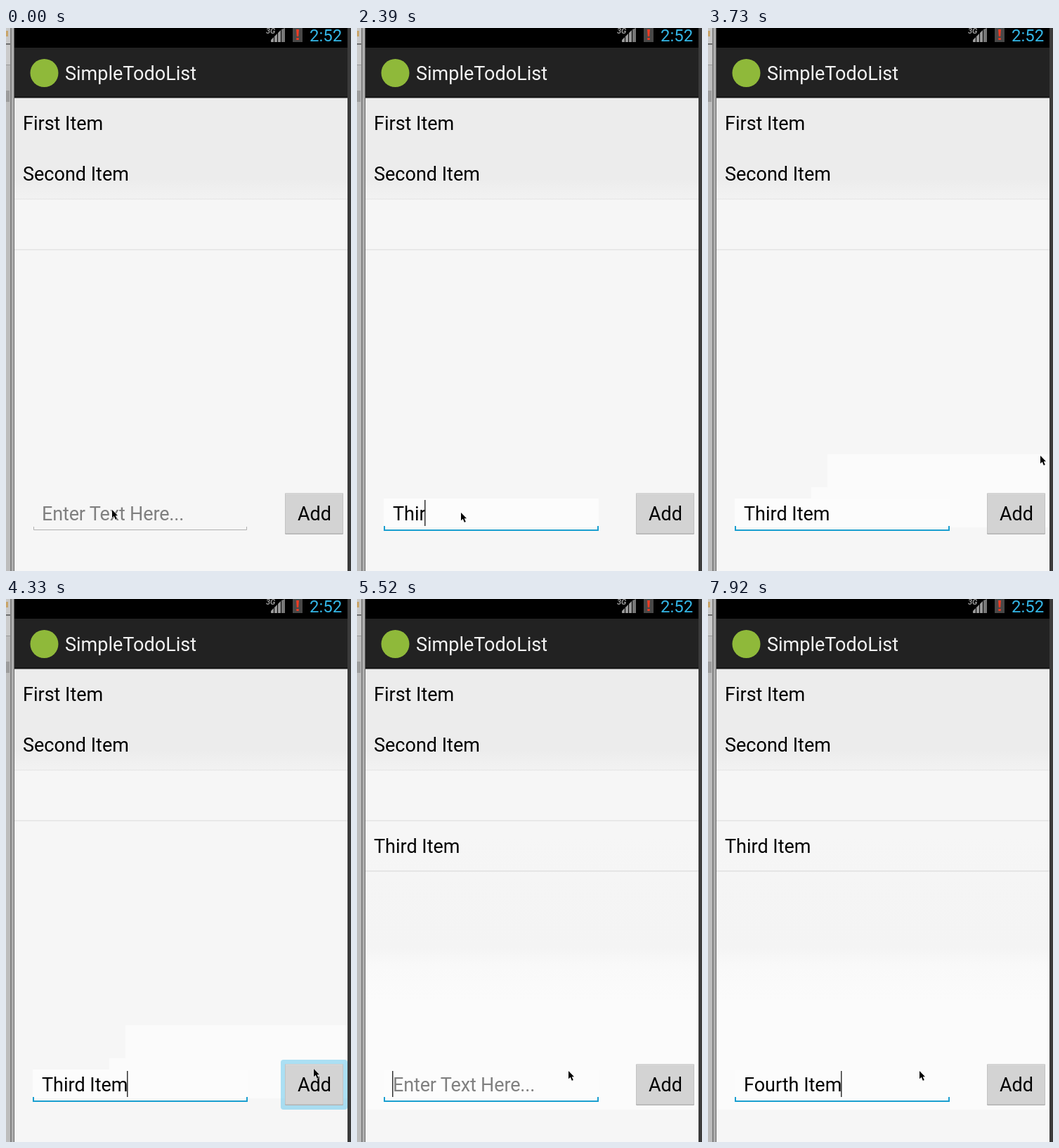
Recreate the animation shown at these times as an HTML page. Size 491 px wide and 772 px high, loop 8 s.

```html
<!DOCTYPE html>
<html lang="en">
<head>
<meta charset="utf-8">
<title>Todo list</title>
<style>
html, body { margin: 0; width: 100%; height: 100%; overflow: hidden; background: #f6f6f6; }
svg { display: block; width: 100%; height: 100%; }
text { font-family: Roboto, sans-serif; font-size: 27px; white-space: pre; }
</style>
</head>
<body>
<svg viewBox="0 0 491 772" xmlns="http://www.w3.org/2000/svg">
  <defs>
    <linearGradient id="rows" x1="0" y1="0" x2="0" y2="1">
      <stop offset="0" stop-color="#ececec"/>
      <stop offset=".8" stop-color="#ececec"/>
      <stop offset="1" stop-color="#f2f2f2"/>
    </linearGradient>
    <linearGradient id="lower" x1="0" y1="0" x2="0" y2="1">
      <stop offset="0" stop-color="#f6f6f6"/>
      <stop offset=".14" stop-color="#f5f5f5"/>
      <stop offset=".4" stop-color="#f4f4f4"/>
      <stop offset=".47" stop-color="#f9f9f9"/>
      <stop offset=".6" stop-color="#fbfbfb"/>
      <stop offset="1" stop-color="#fbfbfb"/>
    </linearGradient>
  </defs>

  <!-- window edges -->
  <rect width="12" height="772" fill="#bdbdbd"/>
  <rect width="6" height="22" fill="#c9c9c9"/>
  <rect y="4" width="3" height="8" fill="#c9a56a"/>
  <rect y="22" width="7" height="1.5" fill="#555"/>
  <rect y="24" width="6" height="28" fill="#cbcbcb"/>
  <rect y="52" width="6" height="1" fill="#999"/>
  <rect y="89" width="5" height="16" fill="#9c9c9c"/>
  <rect x="6" width="2" height="772" fill="#838383"/>
  <rect x="8" width="3" height="772" fill="#b0b0b0"/>
  <rect x="11" width="1" height="772" fill="#666"/>
  <rect x="486" width="5" height="772" fill="#3b3b3b"/>

  <!-- page -->
  <rect x="12" width="474" height="772" fill="#f6f6f6"/>
  <rect x="12" y="99" width="474" height="144" fill="url(#rows)"/>
  <rect x="12" y="242.5" width="474" height="1.5" fill="#e9e9e9"/>
  <rect x="12" y="314.5" width="474" height="1.5" fill="#e4e4e4"/>

  <!-- status and title bars -->
  <rect x="12" width="474" height="28" fill="#000"/>
  <text x="370" y="7.5" fill="#999" style="font-size:11px;font-weight:700;font-style:italic">3G</text>
  <path d="M377 20V17L381 13V20ZM382 20V12L386 8V20ZM387 20V7L391 3V20Z" fill="#999"/>
  <path d="M392 20V2L397 0V20Z" fill="#777"/>
  <rect x="408" y="0" width="14" height="20" fill="#484848"/>
  <path d="M413.2 2H416.8L416.2 12H413.8ZM413.4 14H416.6V17H413.4Z" fill="#ff3b22"/>
  <text x="432" y="19" fill="#33b5e5" style="font-size:24px">2:52</text>
  <rect x="12" y="28" width="474" height="70" fill="#222"/>
  <rect x="12" y="97" width="474" height="2.5" fill="#161616"/>
  <circle cx="54.5" cy="64" r="20" fill="#8fb93a"/>
  <text x="84" y="74" fill="#f3f3f3">SimpleTodoList</text>

  <text x="24" y="145">First Item</text>
  <text x="24" y="217">Second Item</text>

  <g id="added">
    <rect x="12" y="340" width="474" height="386" fill="url(#lower)"/>
    <rect x="12" y="386" width="474" height="1.5" fill="#e0e0e0"/>
    <text x="24" y="361">Third Item</text>
  </g>
  <path id="trailA" d="M147 653H182V710H147Z" fill="#fbfbfb"/>
  <path id="trailB" d="M170 606H486V710H170Z" fill="#fbfbfb"/>

  <!-- input -->
  <path id="idle" d="M39.5 709V713.5H342.5V709" fill="none" stroke="#b0b0b0"/>
  <g id="focus">
    <rect x="38" y="669" width="306" height="41" fill="#fcfcfc"/>
    <path d="M39 708V714H343V708" fill="none" stroke="#1a9fd0" stroke-width="2"/>
  </g>
  <text id="hint" x="51" y="700" fill="#808080" letter-spacing="-.15">Enter Text Here...</text>
  <text id="typed" x="51" y="700"></text>
  <rect id="caret" y="671" width="1.5" height="37" fill="#333"/>

  <!-- button -->
  <rect id="glow" x="391" y="655" width="95" height="71" rx="4" fill="#33b5e5" fill-opacity=".4"/>
  <rect x="397" y="661" width="83" height="59" rx="1.5" fill="#b2b2b2"/>
  <rect x="397.5" y="661.5" width="82" height="57" rx="1" fill="#d3d3d3"/>
  <rect x="398" y="661.5" width="81" height="1" fill="#dedede"/>
  <text x="439" y="700" text-anchor="middle">Add</text>

  <path id="mouse" d="M0 0V11.2L2.7 8.8L4.8 13.8L6.8 12.9L4.7 8.2H8Z" fill="#000" stroke="#fff" stroke-width="1" paint-order="stroke"/>
</svg>
<script>
const LOOP = 8000, TEXT_X = 51;
const el = id => document.getElementById(id);
const pen = document.createElement('canvas').getContext('2d');
pen.font = '27px Roboto, sans-serif';

// Each entry holds from its time until the next one.
const typing = [
  [0, ''], [1950, 'T'], [2100, 'Th'], [2240, 'Thi'], [2390, 'Thir'], [2540, 'Third'], [2690, 'Third '],
  [2980, 'Third I'], [3130, 'Third It'], [3280, 'Third Item'], [4480, ''],
  [6720, 'F'], [7020, 'Four'], [7320, 'Fourth'], [7470, 'Fourth '], [7770, 'Fourth It'], [7920, 'Fourth Item']
];
const blink = [
  [0, 0], [900, 1], [1350, 0], [1950, 1], [3730, 0], [4180, 1],
  [5070, 0], [5520, 1], [5970, 0], [6570, 1]
];
const moves = [
  [0, [151, 685]], [600, [148, 689]], [3580, [171, 654]], [3730, [473, 608]], [3880, [462, 628]],
  [4030, [446, 655]], [4180, [438, 668]], [4780, [400, 669]], [4930, [330, 670]], [5070, [301, 671]]
];

const at = (track, t) => track.filter(k => k[0] <= t).pop()[1];
const show = (id, on) => el(id).setAttribute('visibility', on ? 'visible' : 'hidden');

function draw(t) {
  const text = at(typing, t), focused = t >= 900, added = t >= 4480;
  show('added', added);
  show('trailA', t >= 3580 && !added);
  show('trailB', t >= 3730 && !added);
  show('idle', !focused);
  show('focus', focused);
  show('hint', !text);
  show('glow', t >= 4330 && !added);
  show('caret', at(blink, t));
  el('typed').textContent = text;
  el('caret').setAttribute('x', Math.floor(TEXT_X + pen.measureText(text).width) - 1);
  el('mouse').setAttribute('transform', `translate(${at(moves, t)})`);
}

const start = performance.now();
function tick() {
  draw((performance.now() - start) % LOOP);
  requestAnimationFrame(tick);
}
tick();
</script>
</body>
</html>
```
